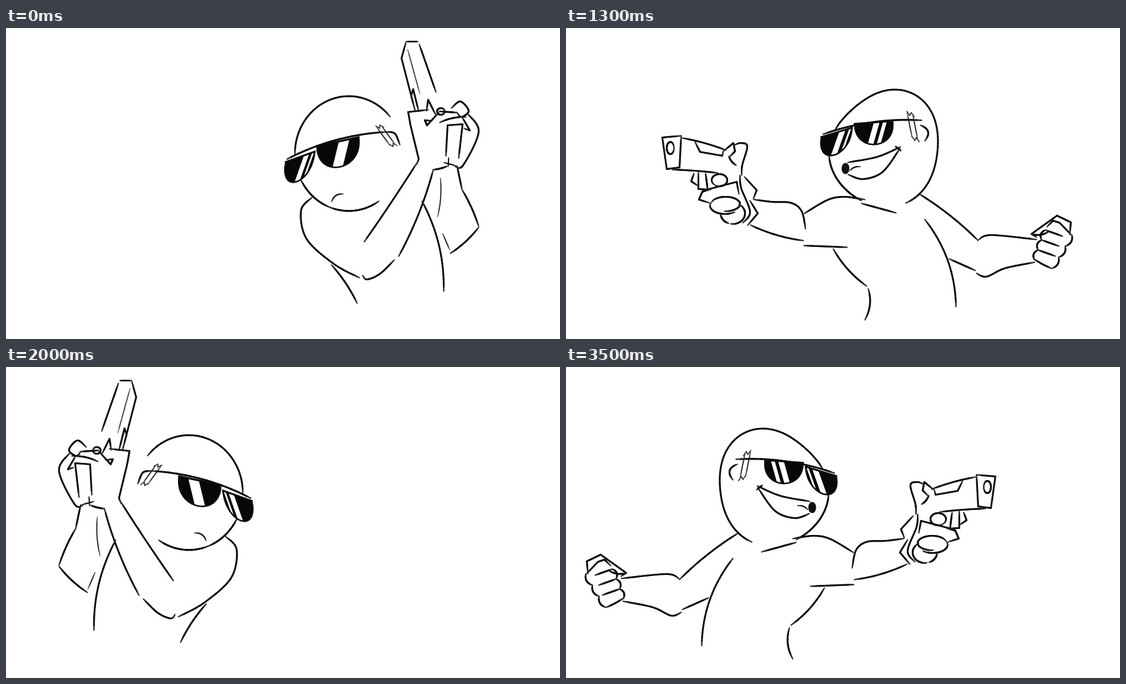
An HTML page with a canvas for the animation above (4.1 s loop, 998x561 px).

```html
<!DOCTYPE html>
<html lang="en">
<head>
<meta charset="utf-8">
<title>Standoff sketch</title>
<style>
html, body { margin: 0; width: 100%; height: 100%; overflow: hidden; background: #fff; }
canvas { display: block; width: 998px; height: 561px; }
</style>
</head>
<body>
<canvas id="stage" width="998" height="561"></canvas>
<script>
const W = 998, H = 561, MIRROR = 947, LOOP = 4100;
const BOLD = 3.2, FINE = 2, RAD = Math.PI / 180;
const stage = document.getElementById('stage').getContext('2d');
let g;

const sample = (n, f) => Array.from({ length: n + 1 }, (_, i) => f(i / n));
const pairs = n => Array.from({ length: n.length / 2 }, (_, i) => [n[2 * i], n[2 * i + 1]]);

// Pencil stroke: thinner and paler towards both ends
function ink(pts, width = BOLD, tone = 12) {
  const run = [0];
  for (let i = 1; i < pts.length; i++)
    run.push(run[i - 1] + Math.hypot(pts[i][0] - pts[i - 1][0], pts[i][1] - pts[i - 1][1]));
  const total = run[run.length - 1], reach = Math.min(12, total / 4);
  g.lineCap = 'round';
  for (let i = 1; i < pts.length; i++) {
    const mid = (run[i] + run[i - 1]) / 2;
    const press = Math.min(1, 0.35 + 0.65 * Math.min(mid, total - mid) / reach);
    const grey = Math.round(tone + (1 - press) * 70);
    g.strokeStyle = `rgb(${grey},${grey},${grey})`;
    g.lineWidth = width * (0.5 + 0.5 * press);
    g.beginPath();
    g.moveTo(...pts[i - 1]);
    g.lineTo(...pts[i]);
    g.stroke();
  }
}

function fill(pts, color) {
  g.fillStyle = color;
  g.beginPath();
  pts.forEach(p => g.lineTo(...p));
  g.fill();
}

// Arc between two points; a positive bend bulges to the left of the way travelled
function bow(x1, y1, x2, y2, bend = 0, width, tone) {
  const dx = x2 - x1, dy = y2 - y1, len = Math.hypot(dx, dy);
  ink(sample(24, t => {
    const lift = 4 * t * (1 - t) * bend / len;
    return [x1 + dx * t + dy * lift, y1 + dy * t - dx * lift];
  }), width, tone);
}

// Catmull-Rom curve through key points
function curve(...n) {
  const p = pairs(n), last = p.length - 1;
  ink(sample(12 * last, f => {
    const i = Math.min(last - 1, Math.floor(f * last)), t = f * last - i;
    const b = p[i], c = p[i + 1], a = p[i - 1] || b, d = p[i + 2] || c;
    return [0, 1].map(k => b[k] + 0.5 * t * (c[k] - a[k] +
      t * (2 * a[k] - 5 * b[k] + 4 * c[k] - d[k] + t * (3 * (b[k] - c[k]) + d[k] - a[k]))));
  }));
}

function line(...n) {
  const p = pairs(n), last = p.length - 1;
  ink(sample(8 * last, f => {
    const i = Math.min(last - 1, Math.floor(f * last)), t = f * last - i;
    return [0, 1].map(k => p[i][k] + (p[i + 1][k] - p[i][k]) * t);
  }));
}

const oval = (cx, cy, rx, ry, from = 0, to = 360) => sample(60, t => {
  const a = (from + (to - from) * t) * RAD;
  return [cx + rx * Math.cos(a), cy + ry * Math.sin(a)];
});

// Egg outline of the tilted head, as a radius over the angle
const egg = (from, to) => sample(70, t => {
  const a = (from + (to - from) * t) * RAD;
  const r = 101 + 6 * Math.cos(a - 38 * RAD) - 5.7 * Math.cos(2 * a - 54 * RAD) - 4.1 * Math.cos(3 * a);
  return [571 + r * Math.cos(a), 214 + r * Math.sin(a)];
});

// Half-round lens hung from its top edge; glints are [from, to] shares of that edge
function lens(x1, y1, x2, y2, vx, vy, glints) {
  const at = (u, depth) => [x1 + (x2 - x1) * u + vx * depth, y1 + (y2 - y1) * u + vy * depth];
  const rim = sample(40, t => at((1 - Math.cos(Math.PI * t)) / 2, Math.sin(Math.PI * t) ** 0.8));
  rim.push(rim[0]);
  fill(rim, '#080808');
  g.save();
  g.clip();
  for (const [a, b] of glints)
    fill([at(a, 0.05), at(b, 0.05), at(b - 0.2, 1), at(a - 0.2, 1)], '#fff');
  g.restore();
  ink(rim, 2.6);
}

// Scribbled plaster: two long sides with zigzag ends
function plaster(x, y, dx, dy, wx, wy) {
  const zigzag = (px, py) => ink(sample(3, t => {
    const jag = t * 3 % 2 ? 0.09 : -0.05;
    return [px + wx * t * 1.2 + dx * jag, py + wy * t * 1.2 + dy * jag];
  }), FINE, 45);
  bow(x, y, x + dx, y + dy, 0, FINE, 45);
  bow(x + wx, y + wy, x + wx + dx, y + wy + dy, 0, FINE, 45);
  zigzag(x, y);
  zigzag(x + dx, y + dy);
}

function guardHead() {
  for (const [from, to] of [[-40, -181], [153, 110], [111, 56]])
    ink(oval(617, 226, 97, 103.5, from, to));
  bow(586, 313, 607, 299, 5, 2.4, 30);
  lens(503, 241, 556, 222, -6, 45, [[0.62, 0.8], [0.9, 0.97]]);
  lens(559, 212, 635, 196, 4, 46, [[0.52, 0.77]]);
  bow(506, 236, 685, 187, 10, 3.4);
  curve(685, 187, 700, 190, 709, 210);
  plaster(667, 178, 24, 33, 9, -2);
}

function guardHands() {
  line(741, 24, 721, 24);
  line(720, 25, 712, 54, 736, 147);
  bow(744, 29, 774, 115);
  bow(723, 38, 745, 118, 0, FINE, 70);
  line(729, 124, 733, 110, 743, 150);

  line(760, 147, 724, 151, 728, 174, 743, 236, 739, 246);
  line(757, 149, 760, 129, 774, 157);
  line(767, 167, 754, 166, 758, 175, 779, 152);
  ink(oval(783, 150, 7, 6));
  bow(780, 150, 812, 152);
  bow(781, 170, 828, 160, 3);
  curve(802, 144, 818, 132, 833, 149, 820, 160, 812, 152);
  line(821, 160, 835, 184, 825, 181);
  curve(831, 154, 851, 187, 823, 247, 808, 249);
  line(792, 230, 795, 175, 822, 173, 815, 234);
  bow(788, 242, 810, 248, 0, FINE);
  bow(797, 233, 796, 250, 0, FINE);
  bow(794, 249, 769, 255, 1);
}

function guardBody() {
  bow(739, 244, 645, 385, 1);
  bow(769, 256, 707, 411, 5);
  curve(699, 418, 673, 443, 650, 453, 642, 446);
  bow(812, 248, 821, 291);
  bow(821, 291, 851, 357, 2);
  bow(851, 359, 800, 406, 3);
  bow(786, 370, 799, 400, 0, FINE, 50);
  bow(782, 270, 777, 340, 3, FINE, 45);
  bow(749, 312, 788, 474, 11);
  curve(551, 305, 531, 329, 541, 380, 590, 425, 636, 450);
  bow(586, 427, 632, 496, 3);
}

function aimHead() {
  ink(egg(-161, 68));
  ink(egg(172, 112));
  lens(459, 196, 515, 179, -4, 41, [[0.58, 0.78], [0.9, 0.97]]);
  lens(519, 172, 588, 167, 3, 40, [[0.5, 0.65], [0.74, 0.84]]);
  bow(463, 191, 640, 166, 9, 3.4);
  bow(638, 175, 646, 203, 10);
  plaster(614, 152, 9, 45, 10, 3);
  curve(507, 242, 560, 232, 602, 214);
  curve(508, 264, 535, 272, 570, 259, 601, 217);
  bow(593, 213, 603, 221);
  fill(oval(503, 253, 7, 10), '#111');
  bow(511, 257, 530, 250, 3, FINE);
}

function aimBody() {
  curve(429, 334, 470, 310, 500, 304, 538, 309);
  bow(532, 316, 594, 333);
  bow(636, 299, 742, 383, 4);
  curve(743, 381, 766, 373, 847, 381);
  bow(690, 416, 737, 437);
  curve(739, 442, 757, 448, 790, 433, 844, 422);
  bow(646, 345, 702, 502, 14);
  bow(481, 398, 541, 465, -5);
  bow(544, 470, 538, 526, 6);
  curve(338, 309, 370, 313, 405, 315, 424, 330, 431, 362);
  bow(332, 355, 427, 383, -4);
  bow(428, 392, 506, 395);
}

function fist() {
  line(847, 377, 838, 371, 884, 338, 909, 350, 907, 372);
  bow(838, 371, 870, 366, -4);
  line(866, 358, 877, 347, 889, 351, 911, 374);
  for (let i = 0; i < 3; i++) {
    const x = 863 - 6.5 * i, y = 364 + 18 * i, rx = 911 - 12 * i, ry = 373 + 20 * i;
    bow(x, y, x - 6.5, y + 18, -5);
    bow(x, y, x + 31, y + 11);
    bow(rx, ry, rx - 12, ry + 20, 5);
  }
  bow(844, 417, 874, 433, -1);
}

function pistol() {
  line(207, 194, 173, 197, 181, 254, 204, 251, 207, 194);
  ink(oval(187.5, 216, 6.5, 11));
  bow(209, 198, 288, 220, 2);
  line(232, 205, 241, 223, 281, 230, 283, 221);
  bow(191, 255, 273, 261, 1);
  line(284, 221, 301, 207, 304, 222, 293, 233);
  curve(302, 211, 314, 207, 326, 213, 317, 247, 316, 265);
  bow(293, 231, 306, 247, -2);
  line(238, 259, 238, 290, 260, 291);
  bow(251, 262, 255, 293);
  line(230, 262, 225, 276, 237, 284);
  ink(oval(276, 274, 14, 11, 130, 490));
}

function grip() {
  line(246, 293, 307, 277, 311, 299);
  line(258, 291, 245, 295, 239, 309, 258, 315);
  ink(oval(287, 317, 26, 13, -165, 95));
  ink(oval(286, 320, 27, 15, 200, 50));
  ink(oval(300, 334, 22, 19, 175, 110));
  ink(oval(300, 334, 22, 19, 100, -60));
  curve(313, 265, 315, 288, 331, 331, 318, 351);
  line(321, 268, 343, 292, 337, 308);
  line(331, 311, 345, 334, 327, 355);
}

function muzzleFlash() {
  const star = sample(16, t => {
    const a = t * 2 * Math.PI, r = t * 16 % 2 ? 0.5 : 1;
    return [116 - 78 * r * Math.cos(a), 222 - 63 * r * Math.sin(a)];
  });
  fill(star, '#fff');
  line(...star.flat());
}

function guard() {
  guardBody();
  guardHead();
  guardHands();
}

function aim(firing) {
  aimBody();
  aimHead();
  fist();
  if (firing) {
    muzzleFlash();
    g.translate(21, 8);
    fill(pairs([174, 196, 207, 194, 314, 207, 317, 265, 343, 292, 327, 355, 240, 309, 181, 253]), '#fff');
  }
  pistol();
  grip();
}

function render(draw) {
  const sheet = document.createElement('canvas');
  sheet.width = W;
  sheet.height = H;
  g = sheet.getContext('2d');
  g.translate(0.5, 0.5);
  draw();
  return sheet;
}

const guardPose = render(guard);
const aimPose = render(() => aim(false));
const firePose = render(() => aim(true));

function poseAt(t) {
  if (t < 1000) return guardPose;
  const beat = Math.floor((t - 1200) / 100);
  return beat === 0 || beat === 2 ? firePose : aimPose;
}

function frame() {
  const t = performance.now() % LOOP;
  const flipped = t >= 2000;
  stage.setTransform(1, 0, 0, 1, 0, 0);
  stage.fillStyle = '#fff';
  stage.fillRect(0, 0, W, H);
  if (flipped) stage.setTransform(-1, 0, 0, 1, MIRROR, 0);
  stage.drawImage(poseAt(flipped ? t - 2000 : t), 0, 0);
  requestAnimationFrame(frame);
}
frame();
</script>
</body>
</html>
```
